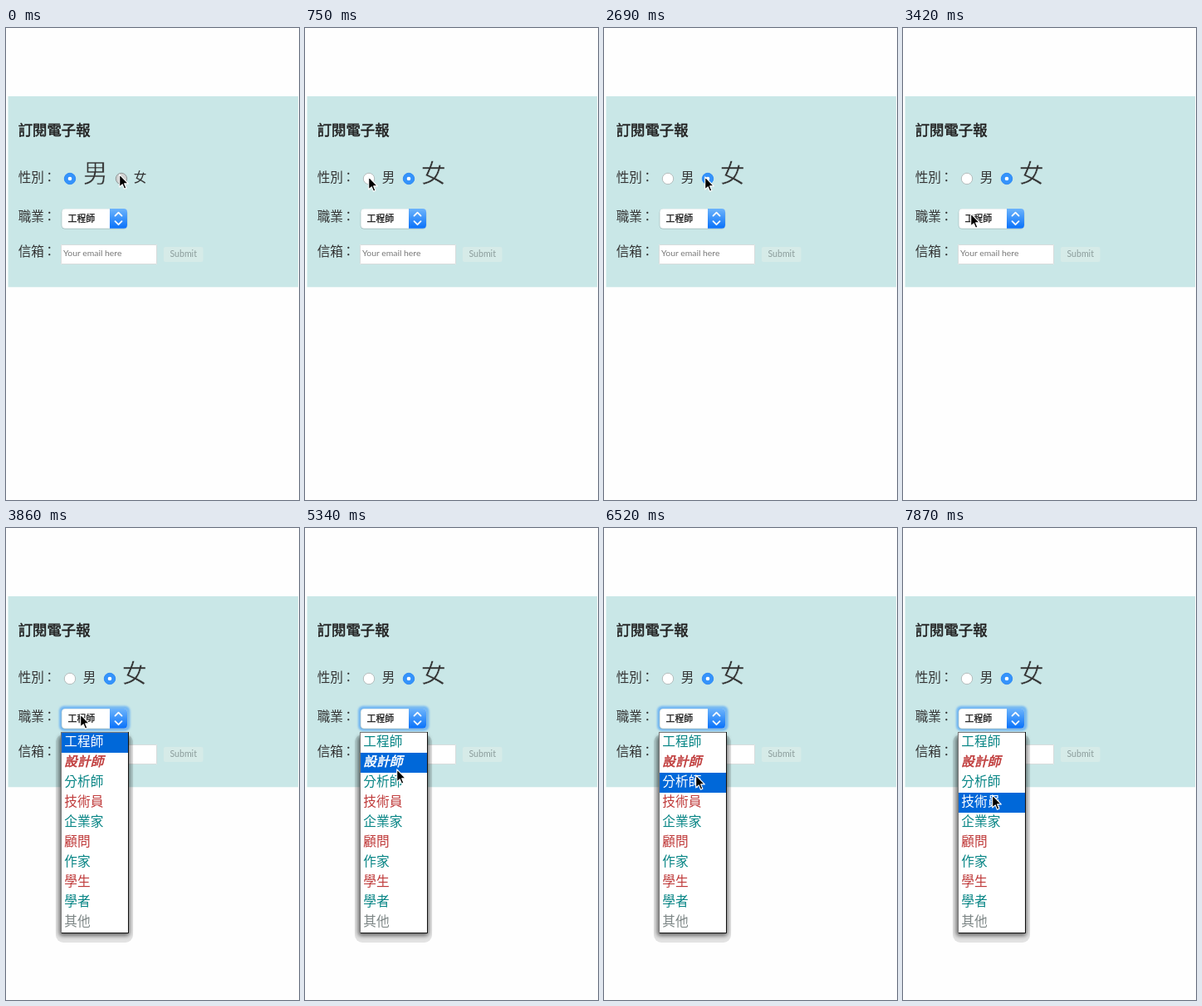
Recreate the animation shown at these times as an HTML page. Size 353 px wide and 567 px high, loop 8000 ms.

```html
<!DOCTYPE html>
<html lang="zh-TW">
<head>
<meta charset="utf-8">
<title>訂閱電子報</title>
<style>
  html, body { margin: 0; width: 100%; height: 100%; overflow: hidden; background: #fefefe; }
  svg { display: block; width: 353px; height: 567px; }
  text { font-family: "Noto Sans CJK TC", "Noto Sans CJK SC", "Noto Sans CJK JP", sans-serif; fill: currentColor; color: #333; }
  .latin { font-family: Lato, "Open Sans", sans-serif; }
  .strong { stroke: currentColor; stroke-width: .55px; }
  .ring { fill: #fff; stroke: #b4bcbc; }
  .dot { fill: none; }
  .pressed .ring { fill: #d0d2d2; stroke: #8f9696; }
  .on .ring { fill: #3593fb; stroke: #2f8cf5; }
  .on .dot { fill: #fff; }
  .on text { stroke: #c9e7e7; stroke-width: .5px; }
  .teal { color: #078585; }
  .red { color: #bf3a3a; }
  .grey { color: #7d8686; }
  .active text { color: #fff; }
  .bar { fill: none; }
  .active .bar { fill: #0068d9; }
  .slanted { font-style: italic; }
</style>
</head>
<body>
<svg viewBox="0 0 353 567">
  <defs>
    <linearGradient id="blue" x2="0" y2="1">
      <stop stop-color="#6db4fb"/><stop offset="1" stop-color="#0871fa"/>
    </linearGradient>
    <filter id="blur" x="-20%" y="-20%" width="140%" height="140%"><feGaussianBlur stdDeviation="2.5"/></filter>
    <filter id="soft" x="-20%" y="-20%" width="140%" height="140%"><feGaussianBlur stdDeviation=".8"/></filter>
  </defs>

  <rect width="353" height="567" fill="#fefefe"/>
  <rect x="2.5" y="82" width="349.5" height="229.3" fill="#c9e7e7"/>
  <text class="strong" x="14.7" y="129" font-size="17.4" style="color:#222">訂閱電子報</text>
  <g font-size="15.6">
    <text x="14.7" y="185.4">性別<tspan dx="-1.5">：</tspan></text>
    <text x="14.7" y="232.4">職業<tspan dx="-1.5">：</tspan></text>
    <text x="14.7" y="274.4">信箱<tspan dx="-1.5">：</tspan></text>
  </g>

  <g id="male" transform="translate(77 181)">
    <circle class="ring" r="6.7"/><circle class="dot" r="2.3"/><text x="15.7" y="4.4">男</text>
  </g>
  <g id="female">
    <circle class="ring" r="6.7"/><circle class="dot" r="2.3"/><text x="14.8" y="4.4">女</text>
  </g>

  <rect x="66" y="260" width="116" height="24" fill="#fff"/>
  <path d="M66.5 283.5V260.5H181.5V283.5Z" fill="none" stroke="#d8dddd"/>
  <text class="latin" x="69" y="274.4" font-size="10.4" style="color:#777">Your email here</text>
  <rect x="190" y="263" width="47.5" height="18" rx="2" fill="#d6ebe8"/>
  <text class="latin" x="213.7" y="274.6" font-size="10.6" text-anchor="middle" style="color:#8b9c9b">Submit</text>

  <rect id="focus" x="64" y="213.8" width="85.5" height="30" rx="6" fill="#74b8f2" filter="url(#soft)"/>
  <rect x="66.7" y="217.3" width="79.6" height="24.2" rx="4.5" fill="#9fb9ba"/>
  <rect x="67.3" y="217.3" width="78.7" height="23.5" rx="4" fill="#fff"/>
  <path d="M125 217H142A4 4 0 0 1 146 221V236.8A4 4 0 0 1 142 240.8H125Z" fill="url(#blue)"/>
  <path d="M131.5 225.6L135.5 221.6L139.5 225.6M131.5 232.2L135.5 236.2L139.5 232.2" fill="none" stroke="#fff" stroke-width="1.8" stroke-linecap="round" stroke-linejoin="round"/>
  <text x="74.5" y="232.8" font-size="10.9" class="strong" style="color:#111;stroke-width:.25px">工程師</text>

  <g id="menu">
    <rect x="60" y="248" width="93" height="250" rx="9" opacity=".11"/>
    <rect x="64" y="250" width="85" height="240" rx="4" opacity=".52" filter="url(#blur)"/>
    <rect x="66" y="245" width="82" height="242" fill="#777"/>
    <path d="M67 486.5H147.5V245" fill="none" stroke="#111"/>
    <rect x="67" y="246" width="80" height="240" fill="#fff"/>
    <g id="rows" font-size="15.7"></g>
  </g>

  <path id="cursor" d="M.7 .9V16L4.2 12.8L6.5 18.2L8.9 17.2L6.6 11.9H11.3Z" stroke="#fff" stroke-width="1.1" stroke-linejoin="round"/>
</svg>
<script>
const LOOP = 8000, BEAT = 148;
const MENU_TOP = 246, ROW = 24, OPEN = 26;
const clicks = [1, 7, 15];          // each one switches the gender
const path = [                      // beat, x, y of the pointer
  [0, 136, 175], [5, 76, 178], [8, 76, 178], [10, 128, 179], [12, 133, 179],
  [15, 133, 179], [18, 121, 178], [22, 73, 221], [24, 89, 223], [31, 89, 224],
  [36, 110, 289], [37, 110, 296], [38, 110, 296], [40, 110, 290], [42, 110, 290],
  [44, 110, 296], [51, 110, 296], [53, 107, 320]
];
const $ = id => document.getElementById(id);

const jobs = ['工程師', '設計師', '分析師', '技術員', '企業家', '顧問', '作家', '學生', '學者', '其他'];
$('rows').innerHTML = jobs.map((job, i) => {
  const y = MENU_TOP + i * ROW;
  const color = i === jobs.length - 1 ? 'grey' : i % 2 ? 'red' : 'teal';
  return `<g><rect class="bar" x="67" y="${y}" width="80" height="${ROW}"/>
    <text class="${color}${i === 1 ? ' slanted strong' : ''}" x="70.3" y="${y + 15.8}">${job}</text></g>`;
}).join('');
const rows = [...$('rows').children];

function pointer(beat) {
  const next = path.findIndex(p => p[0] > beat);
  if (next < 0) return path.at(-1).slice(1);
  const [from, x, y] = path[next - 1], [to, x2, y2] = path[next];
  const k = (beat - from) / (to - from);
  return [x + (x2 - x) * k, y + (y2 - y) * k].map(Math.round);
}

function setRadio(id, on, pressed) {
  $(id).setAttribute('class', (on ? 'on ' : '') + (pressed ? 'pressed' : ''));
  $(id).querySelector('text').setAttribute('font-size', on ? 30 : 15.6);
}

function render(t) {
  const beat = Math.floor(t / BEAT);
  const [x, y] = pointer(beat);
  const female = clicks.filter(c => c <= beat).length % 2 === 1;
  const pressed = clicks.includes(beat + 1);
  const open = beat >= OPEN;
  const active = Math.max(0, Math.floor((y - MENU_TOP) / ROW));

  $('cursor').setAttribute('transform', `translate(${x} ${y})`);
  setRadio('male', !female, pressed && female);
  setRadio('female', female, pressed && !female);
  $('female').setAttribute('transform', `translate(${female ? 125 : 139} 181)`);
  for (const id of ['focus', 'menu']) $(id).style.display = open ? '' : 'none';
  rows.forEach((row, i) => row.setAttribute('class', i === active ? 'active' : ''));
}

const start = performance.now();
function tick() {
  render((performance.now() - start) % LOOP);
  requestAnimationFrame(tick);
}
tick();
</script>
</body>
</html>
```
